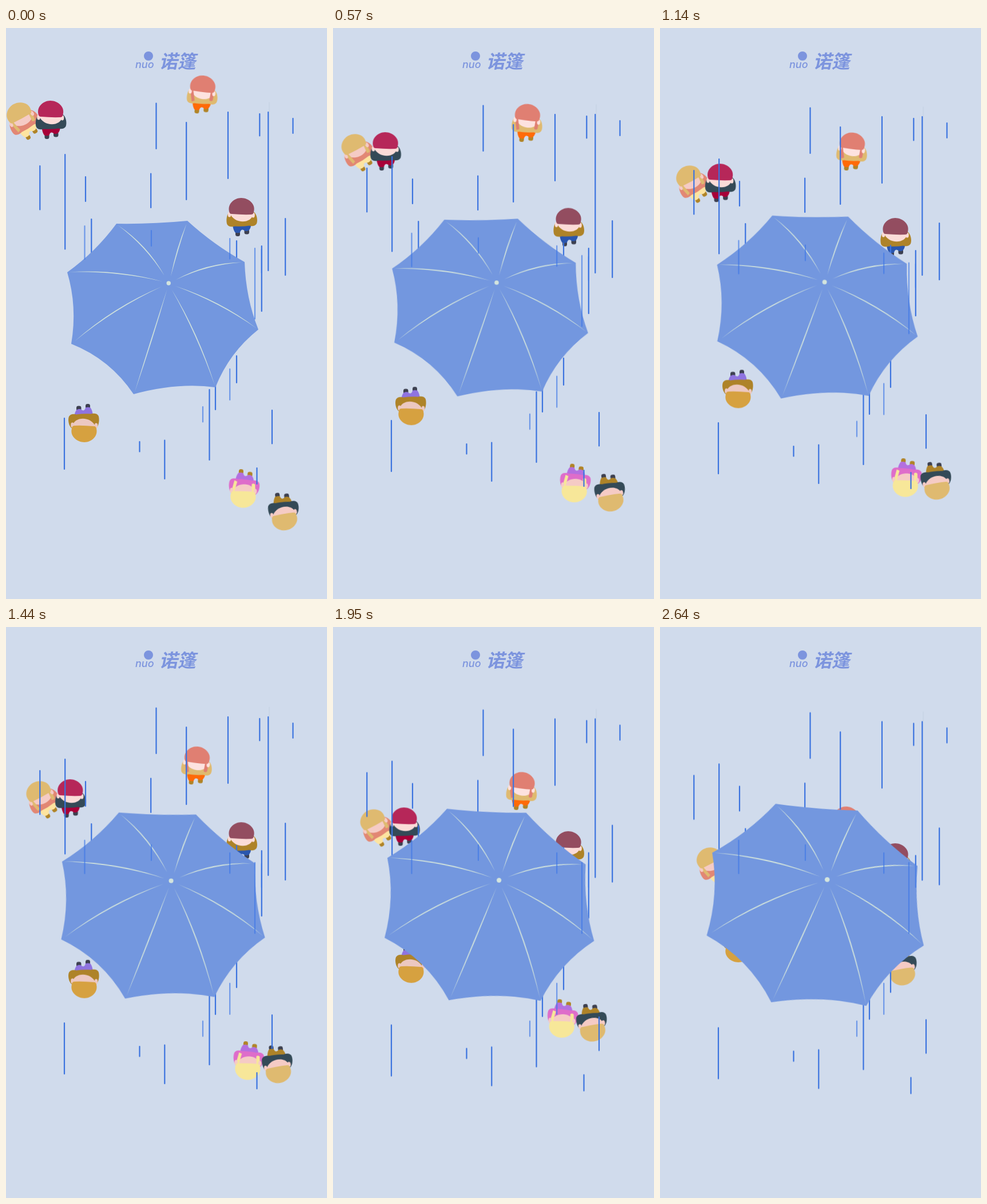
Animation of 561 by 998 pixels, one loop 2.67 s. Source, as an HTML page:

```html
<!DOCTYPE html>
<html lang="zh">
<head>
<meta charset="utf-8">
<title>Rain</title>
<style>
html, body { margin: 0; width: 100%; height: 100%; overflow: hidden; background: #d0dbec; }
svg { display: block; width: 100%; height: 100%; }

/* the clock ticks every 30 ms: 89 ticks per loop */
.walk, .rain, .mist, .umbrella { animation: drift 2670ms steps(89) infinite; }
.rain { --y: 18.6px; fill: none; stroke: #3b73df; stroke-width: 2.2; stroke-linecap: round; }
.mist { animation-name: mist; fill: none; stroke: #3f78e6; stroke-width: 2.2; stroke-linecap: round; opacity: .68; }
.umbrella { animation-name: open; transform-origin: 284px 446px; }
.pink { animation-name: pink; }
.navy { animation-name: navy; }

@keyframes drift { to { transform: translate(var(--x, 0px), var(--y, 0px)); } }
@keyframes open {
  from { transform: translate(0, 0) rotate(0deg) scale(1); }
  to { transform: translate(8.1px, -4.6px) rotate(7.1deg) scale(1.16); }
}
@keyframes mist {
  0% { transform: translate(0, 0); animation-timing-function: steps(40); }
  44.94382%, 100% { transform: translate(0, 26.8px); }
}
@keyframes pink {
  0% { transform: translate(0, 0); animation-timing-function: steps(42); }
  47.19101% { transform: translate(16px, -21px); animation-timing-function: steps(47); }
  100% { transform: translate(-46.7px, -224.7px); }
}
@keyframes navy {
  0% { transform: translate(0, 0); animation-timing-function: steps(29); }
  32.58427% { transform: translate(-2px, -50.5px); animation-timing-function: steps(13); }
  47.19101% { transform: translate(-3px, -55.3px); animation-timing-function: steps(47); }
  100% { transform: translate(-64.3px, -256px); }
}

.hat { fill: var(--hat); }
.coat { fill: var(--coat); }
.face { fill: var(--face); }
.legs { fill: var(--legs); }
.shoe { fill: var(--shoe); }
.logo { fill: #7c94de; }
</style>
</head>
<body>
<svg viewBox="0 0 561 998">
  <defs>
    <g id="body">
      <g class="shoe">
        <rect x="-10" y="58" width="8" height="9" rx="3.5"/>
        <rect x="5.5" y="54.500" width="8.5" height="9" rx="3.5"/>
      </g>
      <path class="legs" d="M-15 47Q-14 56-10.500 60.500Q-6 62-2 60.500Q-1 56 2 55.500Q5 56 6 57.500Q10 59 13.500 56.500Q17 53 17.500 46z"/>
      <path class="coat" d="M-18 23C-24 24-27 37-25 45C-23 51-15 51-11 49.500Q2 50.500 14 48.500C19 50 25 49 27 45C30 37 26 23 18 23z"/>
      <path class="face" d="M-20 26L21 28C18 46-13 46-20 26z"/>
    </g>
    <g id="head">
      <g class="face">
        <ellipse cx="-20.500" cy="29" rx="2.800" ry="4.500"/>
        <ellipse cx="21" cy="30" rx="2.800" ry="4.500"/>
      </g>
      <path class="hat" d="M-20 26.500C-26 11-12 0 0 0C13 0 27 11 21.500 26Q21 29 17 29Q0 29.500-16 28Q-19 28-20 26.500z"/>
    </g>
    <g id="man"><use href="#body"/><use href="#head"/></g>
    <g id="woman">
      <use href="#body"/>
      <path class="hat" d="M-21 25L-16.500 47L-11.500 45L-15.500 26zM15.500 27L14 42Q17 45 20 42L21.500 27z"/>
      <use href="#head"/>
    </g>
  </defs>

  <rect width="561" height="998" fill="#d0dbec"/>

  <g class="logo">
    <circle cx="249" cy="49" r="8"/>
    <text x="226" y="70" font-family="Inter, 'Open Sans', sans-serif" font-size="18" font-weight="500" font-style="italic">nuo</text>
    <text transform="translate(268 70) skewX(-12)" font-family="'Noto Sans CJK SC', 'Noto Sans CJK', sans-serif" font-size="32" font-weight="700">诺篷</text>
  </g>

  <g class="walk" style="--x:63.5px;--y:258px">
    <use href="#woman" transform="translate(12.500 133.500) rotate(-30)" style="--hat:#dfba70;--coat:#e28774;--face:#f5cbc5;--legs:#fde4a0;--shoe:#b08427"/>
    <use href="#man" transform="translate(77.500 127)" style="--hat:#b62759;--coat:#344a57;--face:#fbdcd8;--legs:#a80038;--shoe:#3d4050"/>
  </g>
  <g class="walk" style="--x:-18.3px;--y:233.500px">
    <use href="#woman" transform="translate(345 83) rotate(5)" style="--hat:#e07f72;--coat:#dfba70;--face:#fde2df;--legs:#ff6a08;--shoe:#b08427"/>
  </g>
  <g class="walk" style="--y:82px">
    <use href="#man" transform="translate(411 297)" style="--hat:#934d60;--coat:#ae8328;--face:#fbdcd8;--legs:#2a56ae;--shoe:#3d4050"/>
  </g>
  <g class="walk" style="--y:-139.500px">
    <use href="#man" transform="translate(137 724) rotate(180)" style="--hat:#d6a140;--coat:#ae8328;--face:#ecc8c1;--legs:#8f74e0;--shoe:#3d4050"/>
  </g>
  <g class="walk pink">
    <use href="#woman" transform="translate(412.500 838.500) rotate(4) scale(1 -1)" style="--hat:#f7e799;--coat:#de6dca;--face:#f5cbc5;--legs:#b370e0;--shoe:#b08427"/>
  </g>
  <g class="walk navy">
    <use href="#man" transform="translate(489 878) rotate(-8) scale(1 -1)" style="--hat:#dfba70;--coat:#344a57;--face:#f5cbc5;--legs:#ae8328;--shoe:#3d4050"/>
  </g>

  <g class="rain">
    <path d="M262.500 131.500V211M315.200 165V300M388 147V263M443.300 150V188.500M458.300 147V424M501.500 158V184
      M488.200 333V432M446.800 381V495M403 372V420M403 573V620M355.500 632V755M366 600V667M465 668V726.500M438.500 769V797
      M277.300 720.500V788M233.500 723V740.500M102 682V771M59.300 241V317.500M103.200 221V386.500M139 260V303M149.300 334V400M253.200 254.500V314"/>
    <path d="M460 130V146" stroke="#a9b8cc" stroke-width=".6" opacity=".6"/>
  </g>

  <g class="umbrella">
    <path fill="#7397df" d="M193 342Q255 343 317 337Q363 379 417 409Q419 472 441 527Q390 567.500 366 628Q300 619 223 640Q182 579 114 552Q125 487 107 427Q157 391 193 342z"/>
    <path fill="#cfe1dc" d="M196 345Q246.400 378.500 277 433Q243.600 380.700 196 345z
      M110 426.500Q195.200 421.200 273 443Q194.600 424.800 110 426.500z
      M315.500 342Q301 386 288 434Q297.500 385 315.500 342z
      M412 409.500Q350.100 410.400 297 440Q351.300 414 412 409.500z
      M438 525Q375.300 476.800 296 451Q373.100 479.600 438 525z
      M365 625Q336.500 533.500 289.500 457Q333.300 534.900 365 625z
      M225 636Q257.200 542.600 281.500 457Q253.800 541.400 225 636z
      M120 547.500Q187.400 487.500 272 452Q189.200 490.500 120 547.500z"/>
    <circle cx="284.200" cy="446" r="3.700" fill="#d3e4dd"/>
  </g>

  <path class="mist" d="M137.500 346V404M254 354V381M391.200 368V403.500M435 385V508.500M446.800 387V428M391.200 596V650M344 662V688.500"/>
</svg>
</body>
</html>
```
